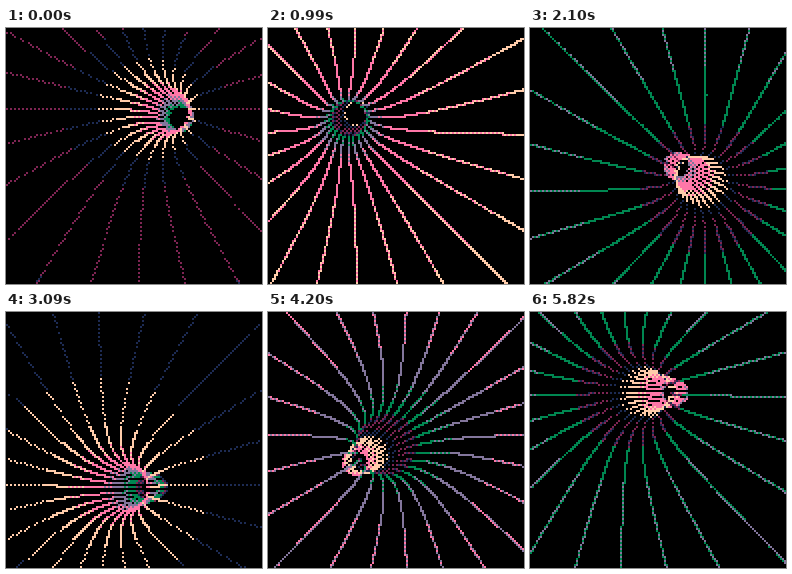
Write an HTML page with a canvas that moves like this. It is 256 px wide and 256 px high and loops after 5.85 s.

```html
<!DOCTYPE html>
<html lang="en">
<head>
<meta charset="utf-8">
<title>Winding tunnel</title>
<style>
  html, body { margin: 0; width: 100%; height: 100%; overflow: hidden; background: #000; }
  canvas { display: block; width: 100vw; height: 100vh; image-rendering: pixelated; }
</style>
</head>
<body>
<canvas id="stage" width="128" height="128"></canvas>
<script>
const ctx = document.getElementById('stage').getContext('2d');
const SIZE = 128, RAYS = 24, STEPS = 195, STEP_MS = 30;
const R_MIN = 6.2, R_MAX = 140, R_GROWTH = 1.006;
const CYCLE = 6;

const palette = {
  P: '#ffccaa', K: '#ff77a8', L: '#83769c', G: '#008751', V: '#7e2553', B: '#1d2b53'
};

// One colour cycle for the two halves of a checkerboard; a dot leaves the cell empty.
const cycles = ['PPKKKLLGGVVB', '.PPKKKLLGB..'];

const dirs = Array.from({ length: RAYS }, (_, i) => {
  const a = i * 2 * Math.PI / RAYS;
  return [Math.cos(a), Math.sin(a)];
});

// Rings follow a figure of eight, lagging with depth.
function center(n, depth) {
  const a = (2 * n - 240 * depth) * Math.PI / 180;
  return [64 - 24 * Math.sin(2 * a), 64 - 24 * Math.cos(a)];
}

function colorsAt(n, depth) {
  const phase = (4.64 + 0.24 * n + 35 * depth) % CYCLE;
  return cycles.map(c => palette[c[Math.floor(phase / CYCLE * c.length)]]);
}

function draw(n) {
  ctx.fillStyle = '#000';
  ctx.fillRect(0, 0, SIZE, SIZE);
  for (let r = R_MIN; r < R_MAX; r *= R_GROWTH) {
    const depth = 1 / r;
    const [cx, cy] = center(n, depth);
    const colors = colorsAt(n, depth);
    for (const [dx, dy] of dirs) {
      const x = Math.floor(cx + r * dx + 1e-6);
      const y = Math.floor(cy + r * dy + 1e-6);
      if (x < 0 || y < 0 || x >= SIZE || y >= SIZE) continue;
      const color = colors[(x + y) % 2];
      if (!color) continue;
      ctx.fillStyle = color;
      ctx.fillRect(x, y, 1, 1);
    }
  }
}

const start = performance.now();
let last = -1;
function tick() {
  const n = Math.floor(Math.max(0, performance.now() - start) / STEP_MS) % STEPS;
  if (n !== last) draw(last = n);
  requestAnimationFrame(tick);
}
tick();
</script>
</body>
</html>
```
